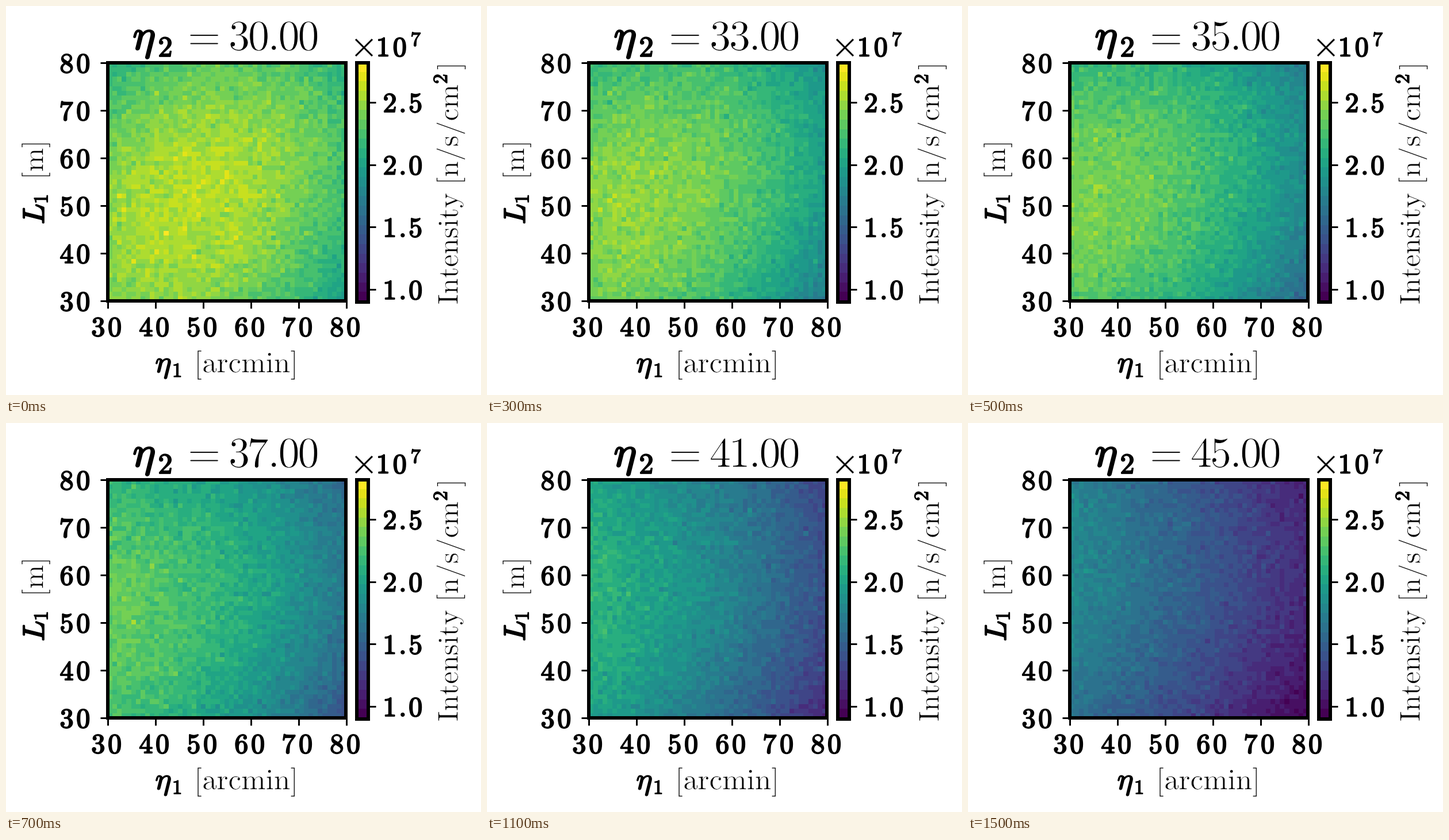
Recreate the animation shown at these times as a matplotlib script. Size 826x678 px, loop 1600 ms.

```python
import numpy as np
import matplotlib.pyplot as plt
from matplotlib.animation import FuncAnimation
from matplotlib.patches import PathPatch, Rectangle
from matplotlib.path import Path
from matplotlib.textpath import TextPath
from matplotlib.transforms import Affine2D

W, H, DPI = 826, 678, 64
PT = 72 / DPI                       # points per pixel
FRAMES, INTERVAL = 16, 100
LEFT, RIGHT, TOP, BOTTOM = 177, 591, 99, 514
BAR_LEFT, BAR_RIGHT, BAR_BOTTOM = 609.5, 630, 515.5
VMIN, VMAX, CELLS, BANDS = 0.908, 2.818, 51, 25
HEAVY, LIGHT = 0.042, 0.014         # outline widths in em

plt.rcParams["mathtext.fontset"] = "cm"
fig = plt.figure(figsize=(W / DPI, H / DPI), dpi=DPI, facecolor="white")
ax = fig.add_axes([0, 0, 1, 1])
ax.axis("off")
cmap = plt.get_cmap("viridis", BANDS)


def word(tex, size):
    """Outline of a formula whose ink starts at x = 0."""
    path = TextPath((0, 0), f"${tex}$", size=size)
    return Affine2D().translate(-path.get_extents().x0, 0).transform_path(path)


def figures(text, size, style, pitch, dot):
    """Number on fixed-pitch cells; the first cell is centred on x = 0."""
    parts, x = [], -pitch * size / 2
    for char in text:
        cell = (dot if char == "." else pitch) * size
        path = word(rf"\{style}{{{char}}}", size)
        shift = x + cell / 2 - path.get_extents().width / 2
        parts.append(Affine2D().translate(shift, 0).transform_path(path))
        x += cell
    return Path.make_compound_path(*parts)


def put(path, x, y, edge, color="black", turn=0):
    """Black glyphs; a black outline thickens them, a white one thins them."""
    place = Affine2D().scale(1, -1).rotate_deg(-turn).translate(x, y)
    patch = PathPatch(path, fc="black", ec=color, lw=edge * PT,
                      joinstyle="round", transform=place + ax.transData, zorder=3)
    return ax.add_artist(patch)


def bold_number(text, x, y, size=48):
    put(figures(text, size, "mathbf", 0.598, 0.332), x, y, HEAVY * size)


def bold_word(tex, size, x, y, turn=0):
    put(word(rf"\mathbf{{{tex}}}", size), x, y, HEAVY * size, turn=turn)


def light(path, size, x, y, turn=0):
    return put(path, x, y, LIGHT * size, "white", turn)


def roman(text, size, x, y, turn=0):
    light(word(rf"\mathrm{{{text}}}", size), size, x, y, turn)


def line(xs, ys, width=3):
    ax.plot(xs, ys, color="black", lw=width * PT, solid_capstyle="butt", zorder=2)


def box(x0, y0, x1, y1):
    ax.add_patch(Rectangle((x0, y0), x1 - x0, y1 - y0, fill=False, ec="black",
                           lw=6 * PT, joinstyle="miter", zorder=2))


def intensity(step):
    """Noisy intensity surface, drifting left and fading as the step grows."""
    t = step / (FRAMES - 1)
    u, w = np.meshgrid(np.linspace(-1, 1, CELLS), np.linspace(1, -1, CELLS))
    mean = (2.56 - 0.8 * t - 0.26 * t**2
            + (-0.11 - 0.75 * t + 0.53 * t**2) * u
            + (-0.22 + 0.2 * t) * u**2
            + (-0.03 + 0.1 * t) * w
            + (-0.2 + 0.08 * t) * w**2
            + (0.12 - 0.11 * t) * u * w)
    noise = np.random.RandomState(step + 7).normal(size=mean.shape)
    return mean + 0.038 * np.sqrt(mean) * noise


def title_number(step):
    return figures(f"{30 + step:.2f}", 75, "mathrm", 0.453, 0.247)


def show(data, x0, y0, x1, y1):
    return ax.imshow(data, cmap=cmap, vmin=VMIN, vmax=VMAX, aspect="auto",
                     interpolation="nearest", extent=(x0, x1, y1, y0), zorder=0)


# Heat map and colour bar
heat = show(intensity(0), LEFT, TOP, RIGHT, BOTTOM)
bar = np.linspace(VMAX, VMIN, BANDS)[:, None]
show(bar, BAR_LEFT, TOP, BAR_RIGHT, BAR_BOTTOM)
box(LEFT, TOP, RIGHT, BOTTOM)
box(BAR_LEFT, TOP, BAR_RIGHT, BAR_BOTTOM)

# Ticks and their numbers
for i in range(6):
    label = str(30 + 10 * i)
    x = LEFT - 0.5 + 83 * i
    y = BOTTOM - 83 * i
    line([x, x], [BOTTOM, 527])
    line([164, LEFT], [y, y])
    bold_number(label, x - 16.2, 575.3)
    bold_number(label, 105.5, y + 17)
for i in range(4):
    y = 494 - 108.7 * i
    line([BAR_RIGHT, 643], [y, y])
    bold_number(f"{1 + i / 2:.1f}", 667.5, y + 17)

# Scale of the colour bar
line([608, 637], [58, 87])
line([608, 637], [87, 58])
bold_number("10", 656, 87.5)
bold_number("7", 713, 69.5, size=35)

# Title
put(word(r"\eta", 75), 222.5, 76, 2.6)
bold_word("2", 50, 267, 88)
light(word("=", 74), 74, 320, 77)
number = light(title_number(0), 75, 405.5, 77)

# Axis labels
put(word(r"\eta", 53), 261, 638.5, 1.9)
bold_word("1", 35, 292, 646.5)
roman("[arcmin]", 51, 333, 638.5)

put(word("L", 52), 66, 378, 2.4, turn=90)
bold_word("1", 35, 72.5, 342, turn=90)
roman("[m]", 50, 64.5, 297, turn=90)

roman("Intensity", 50, 786, 519, turn=90)
roman("[n/s/cm", 50, 786, 306, turn=90)
bold_word("2", 35, 767, 134, turn=90)
roman("]", 50, 786, 110, turn=90)

ax.set_xlim(0, W)
ax.set_ylim(H, 0)


def update(step):
    heat.set_data(intensity(step))
    number.set_path(title_number(step))
    return heat, number


anim = FuncAnimation(fig, update, frames=FRAMES, interval=INTERVAL,
                     repeat=True, repeat_delay=0, blit=False)
plt.show()
```
